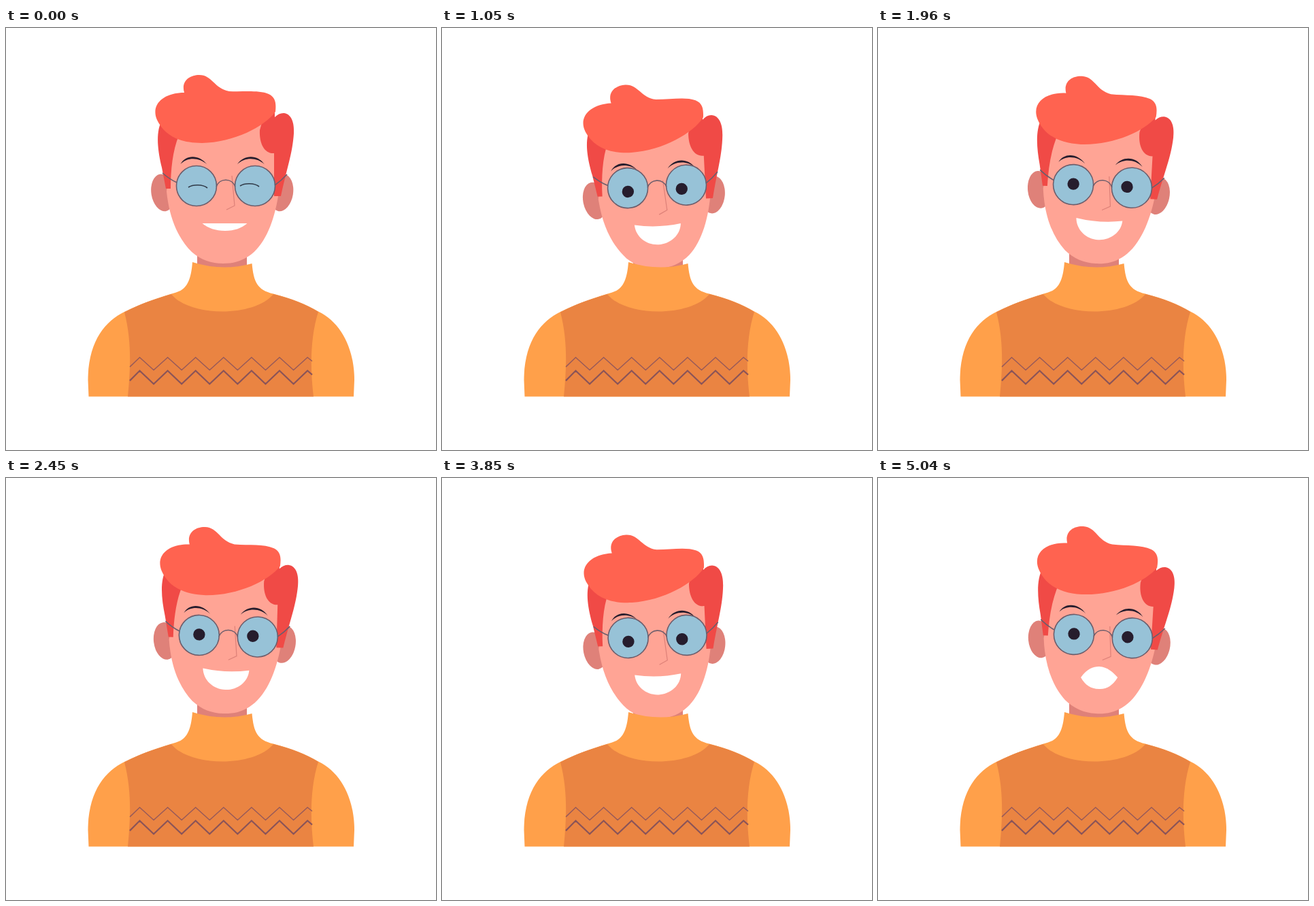
Recreate the animation shown at these times as an HTML page. Size 632 by 620 pixels, loop 5.25 s.

```html
<!DOCTYPE html>
<html lang="en">
<head>
<meta charset="utf-8">
<title>Smiling man</title>
<style>
  html, body { margin: 0; width: 100%; height: 100%; overflow: hidden; background: #fff; }
  svg { display: block; width: 100vw; height: 100vh; }
  .skin { fill: #ffa495; }
  .shade { fill: #df8179; }
  .hair { fill: #ff6350; }
  .side { fill: #f04a46; }
  .wool { fill: #ffa04a; }
  .vest { fill: #ea8442; }
  .dark { fill: #261d2d; }
  .line { fill: none; stroke: #6c5e6c; stroke-width: 1.6; }
</style>
</head>
<body>
<svg viewBox="0 0 632 620">
  <path class="shade" d="M281 325H354V360H281Z"/>

  <g id="head">
    <ellipse class="shade" cx="230.5" cy="242" rx="17" ry="27.5" transform="rotate(-9 230.5 242)"/>
    <ellipse class="shade" cx="405" cy="242" rx="17" ry="27.5" transform="rotate(9 405 242)"/>
    <path class="skin" d="M250 140H394L400 247C394 285 380 320 357 335C345 343 333 346 319 346C302 346 287 341 273 329C253 309 240 280 236 240Z"/>
    <path class="side" d="M228 138C220 155 223 180 229 205L235 236H242C242 208 245 180 254 158Z"/>
    <path class="side" d="M373 150L380 125L395 119V131C399 127 403 125 408 125C420 126 424 140 423 155C421 185 413 205 404 247H394V184C380 185 372 170 373 150Z"/>
    <path id="hair" class="hair" d="M262 95C257 78 270 69 284 69C303 69 306 89 328 93C350 94 371 91 386 97C397 102 397 112 396 123C380 145 335 168 288 169C252 169 232 156 222 135C212 112 232 95 262 95Z"/>
    <path class="dark" d="M256.5 200C264 185.5 284 185.5 295.5 200.5C284 189.5 266 189.5 256.5 200Z"/>
    <path class="dark" d="M340 200C350 185.5 370 185.5 380 200.5C369 189.5 351 189.5 340 200Z"/>
    <path class="line" d="M332 217L336 261L324 267" style="stroke:#dd8078;stroke-width:1.2"/>
    <path id="mouth" fill="#fff"/>
    <g id="glasses" class="line">
      <circle cx="280" cy="232" r="29.5" fill="#97c2d7"/>
      <circle cx="366" cy="232" r="29.5" fill="#97c2d7"/>
      <path d="M309 233C314 220 332 220 337 233M251 227Q240 222 230 213M395 231Q405 224 413 215"/>
    </g>
    <g id="open" class="dark">
      <circle cx="280" cy="231" r="8.7"/>
      <circle cx="359" cy="231" r="8.7"/>
    </g>
    <path id="closed" class="line" style="stroke:#303a48" d="M268 234C275 229.5 289 229.5 296 235M344 232C351 227.5 365 227.5 372 233"/>
  </g>

  <path class="wool" d="M121.5 541.5L120.5 517C121 461 145 431 174 417C203 403 228 395 250 388.5C266 384 272 370 274 344Q318 358 361.5 346C364 373 369 385 393 390.5C420 397.5 440 405.5 459 416.5C492 432 512 471 512 517L511 541.5Z"/>
  <path class="vest" d="M174 417.5C198 405 220 397.5 243 391C270 425 365 425 393 391C420 397.5 440 405.5 459 417C447 455 447 500 452 541.5H179C183 500 185 460 174 417.5Z"/>
  <path id="zigThin" class="line" style="stroke:#985a59;stroke-width:1.4"/>
  <path id="zigBold" class="line" style="stroke:#8b5458;stroke-width:2.2"/>
</svg>

<script>
const $ = id => document.getElementById(id);
const LOOP = 5250, STEP = 70, REST = 4340;

const mouths = {
  smile: 'M288.5 287H354.5C346 294 336 298 322 298C308 298 297 294 288.5 287Z',
  grin: 'M287 280.5Q321 287 355 281.5C354 299 338 311 321 311C303 311 288 298 287 280.5Z',
  round: 'M294 294.3C302 281 312 277 320 276.7C332 276.5 341 284 348 291.1C341 304 333 309.5 322 309.7C309 310 301 305 294 294.3Z'
};

// time, head tilt, head drop, extra hair drop, glasses drop relative to the head
const poses = [
  [0, 0, 0, 0, 0],
  [350, 0, 2, 4, 0],
  [630, -0.7, 6.5, 1.5, -4.5],
  [910, -2.7, 7.5, 5, -6.5],
  [1015, -3.1, 7.5, 5, -6.5],
  [1400, 3.5, 0, 3.5, 0],
  [1680, 3.5, 0, 3, 0],
  [2450, 1.7, 0, 4, 0],
  [2940, 0.5, 0, 2, 0],
  [3290, 0, 2, 4, 0],
  [3570, -0.7, 6.5, 1.5, -4.5],
  [3850, -2.7, 7.5, 5, -6.5],
  [3920, -2.8, 7.5, 5, -6.5],
  [REST, 3.5, 0, 3.5, 0]
];

const speech = [
  [0, 'smile'], [770, 'grin'], [1260, 'round'], [1820, 'grin'], [2730, 'smile'],
  [3710, 'grin'], [4200, 'round'], [4830, 'grin'], [5040, 'round']
];
const blinks = [[0, 140], [2940, 3080], [4480, 4690]];

// Slope at a key: zero at ends and turning points, otherwise averaged.
function slope(i, c) {
  const a = poses[i - 1], b = poses[i], d = poses[i + 1];
  if (!a || !d) return 0;
  const s1 = (b[c] - a[c]) / (b[0] - a[0]);
  const s2 = (d[c] - b[c]) / (d[0] - b[0]);
  return s1 * s2 <= 0 ? 0 : 2 * s1 * s2 / (s1 + s2);
}

function channel(t, c) {
  const i = Math.max(0, Math.min(poses.length - 2, poses.findIndex(p => p[0] > t) - 1));
  const a = poses[i], b = poses[i + 1], span = b[0] - a[0];
  const u = (t - a[0]) / span, v = 1 - u;
  return a[c] * v * v * (1 + 2 * u) + b[c] * u * u * (3 - 2 * u)
    + span * u * v * (slope(i, c) * v - slope(i + 1, c) * u);
}

function zigzag(top, height) {
  let d = `M182 ${top + height * 0.75}`;
  for (let i = 0; i < 13; i++) d += `L${196.5 + i * 20.55} ${top + (i % 2) * height}`;
  return d + `L450 ${top + height * 0.3}`;
}

function draw(t) {
  const moving = t >= REST ? REST - 0.01 : Math.floor(t / STEP) * STEP;
  const [tilt, drop, hair, glasses] = [1, 2, 3, 4].map(c => channel(moving, c));
  $('head').setAttribute('transform', `translate(${tilt * 0.2} ${drop}) rotate(${tilt} 318 350)`);
  $('hair').setAttribute('transform', `translate(0 ${hair})`);
  $('glasses').setAttribute('transform', `translate(0 ${glasses})`);
  $('mouth').setAttribute('d', mouths[speech.filter(s => s[0] <= t).pop()[1]]);
  const shut = blinks.some(([from, to]) => t >= from && t < to);
  $('open').style.display = shut ? 'none' : '';
  $('closed').style.display = shut ? '' : 'none';
}

$('zigThin').setAttribute('d', zigzag(484, 18.5));
$('zigBold').setAttribute('d', zigzag(503.5, 19.5));

const start = performance.now();
function tick() {
  draw((performance.now() - start) % LOOP);
  requestAnimationFrame(tick);
}
tick();
</script>
</body>
</html>
```
